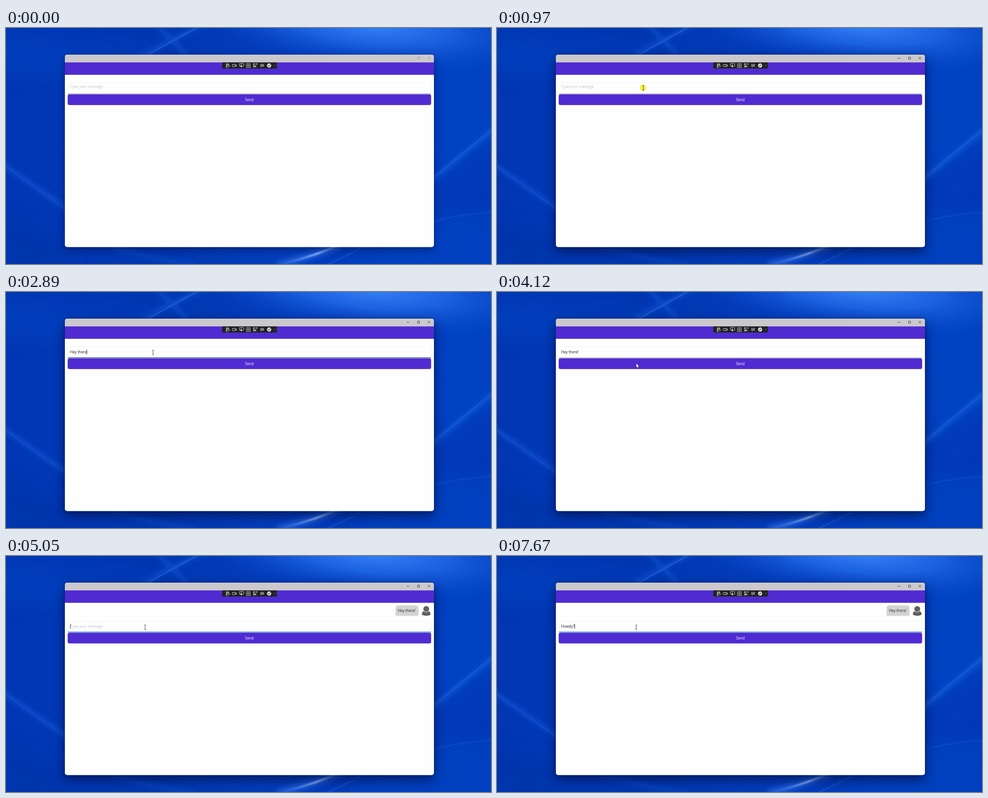
An HTML page that plays this animation: 1071x523 px, repeating every 8000 ms.

```html
<!DOCTYPE html>
<html lang="en">
<head>
<meta charset="utf-8">
<title>Chat window</title>
<style>
  html, body { margin: 0; width: 100%; height: 100%; overflow: hidden; background: #0238b4; }
  svg { display: block; }
  #win { position: absolute; left: 130px; top: 59px; width: 815px; height: 426.5px; border-radius: 5px; }
  #ui { position: absolute; left: 0; top: 0; }
  text { font: 8.05px "Open Sans", "Noto Sans", sans-serif; white-space: pre; }
</style>
</head>
<body>
<svg width="1071" height="523">
  <defs>
    <radialGradient id="glow" gradientUnits="userSpaceOnUse" cx="0" cy="0" r="1" gradientTransform="translate(800 -12) rotate(6) scale(400 105)">
      <stop offset="0" stop-color="#3a86fa"/>
      <stop offset=".45" stop-color="#2068e6" stop-opacity=".85"/>
      <stop offset="1" stop-color="#0a48c8" stop-opacity="0"/>
    </radialGradient>
    <linearGradient id="base" x2="1" y2="0">
      <stop offset="0" stop-color="#0236b2"/>
      <stop offset=".1" stop-color="#0238b6"/>
      <stop offset=".3" stop-color="#0137b0"/>
      <stop offset=".6" stop-color="#033ebd"/>
      <stop offset="1" stop-color="#0239b8"/>
    </linearGradient>
    <linearGradient id="flare" gradientUnits="userSpaceOnUse" x1="600" x2="735" y1="0" y2="0">
      <stop offset="0" stop-color="#2a6ae6" stop-opacity="0"/>
      <stop offset=".65" stop-color="#8db2ff"/>
      <stop offset="1" stop-color="#5a92f8" stop-opacity=".4"/>
    </linearGradient>
    <filter id="b1" x="-50%" y="-50%" width="200%" height="200%"><feGaussianBlur stdDeviation="1.3"/></filter>
    <filter id="b6" x="-50%" y="-50%" width="200%" height="200%"><feGaussianBlur stdDeviation="6"/></filter>
    <filter id="b20" x="-50%" y="-50%" width="200%" height="200%"><feGaussianBlur stdDeviation="20"/></filter>
  </defs>
  <rect width="1071" height="523" fill="url(#base)"/>
  <g filter="url(#b20)">
    <path d="M-30 5Q120 60 330 40L330 100H-30Z" fill="#0846c2" opacity=".55"/>
    <path d="M940 30L1110 0V240L940 330Z" fill="#0a4ccc" opacity=".5"/>
    <path d="M940 420Q1000 405 1110 410V560H700Z" fill="#0644c4" opacity=".6"/>
    <path d="M-30 420L140 470V560H-30Z" fill="#0234ac"/>
  </g>
  <rect x="380" width="691" height="160" fill="url(#glow)"/>
  <g fill="none" filter="url(#b6)" stroke="#1259d8">
    <path d="M-20 292Q60 350 150 410" stroke-width="11" opacity=".6"/>
    <path d="M1095 210Q1020 270 930 345" stroke-width="12" opacity=".7"/>
    <path d="M330 -10L400 60M300 62Q360 25 450 -12" stroke-width="10" opacity=".6"/>
    <path d="M600 525Q680 505 740 480" stroke-width="12" stroke="#2f70e8" opacity=".8"/>
    <path d="M230 485Q310 510 420 525" stroke-width="9" opacity=".45"/>
  </g>
  <g fill="none" filter="url(#b1)">
    <path d="M312 60Q365 30 425 -3" stroke="#3878e8" stroke-width="2" opacity=".65"/>
    <path d="M948 329Q1010 275 1075 224" stroke="#246ae0" stroke-width="3" opacity=".5"/>
    <path d="M-5 303Q60 350 135 404" stroke="#1c5cd8" stroke-width="3" opacity=".35"/>
    <path d="M945 429Q1000 412 1075 409" stroke="#1f60da" stroke-width="2.5" opacity=".45"/>
    <path d="M610 523Q680 505 728 484" stroke="url(#flare)" stroke-width="5"/>
    <path d="M710 524Q755 504 790 484" stroke="#2a68e0" stroke-width="2" opacity=".7"/>
  </g>
</svg>
<div id="win"></div>
<svg id="ui" width="1071" height="523">
  <defs><clipPath id="frame"><rect x="130" y="59" width="815" height="426.5" rx="5"/></clipPath></defs>
  <g clip-path="url(#frame)">
    <rect x="130" y="59" width="815" height="427" fill="#fefefe"/>
    <rect x="130" y="59" width="815" height="17.2" fill="#cbc9cc"/>
    <rect x="130" y="76.2" width="815" height="27.5" fill="#502bd2"/>
  </g>
  <path id="caption" d="M885 67.2h5.5M908.7 64.6h4.6v4.6h-4.6zM931.4 64.3l5 5M936.4 64.3l-5 5" fill="none" stroke-width=".9"/>

  <rect x="477.5" y="76.4" width="120.5" height="13.4" fill="#202020" stroke="#3a3a3a" stroke-width=".5"/>
  <g fill="none" stroke="#e4e4e4" stroke-width=".9">
    <path d="M486 79.2h6.2M486 81.4h6.2M486.4 81v6.2h3M486.5 84h3" stroke-width="1.1"/>
    <path d="M492 82l2.4 2.2-2.4 2.6-2.4-2.6z"/>
    <path d="M500 80.6h6v5h-6zM506 83l2.8-1.8v4.2L506 83.6"/>
    <path d="M518 84.7h-2.3v-5.9h9v5.9H523"/>
    <path d="M531 79h8.5v8.5H531zM533.6 81.6h3.3v3.3h-3.3z"/>
    <path d="M548 79.8h4.5M546.8 81v3M546 79h1.6v1.6H546zM553 79h1.6v1.6H553zM546 85h1.6v1.6H546zM552.3 83.5l2.5 2.7"/>
    <path d="M563 79.8q-3 3.2 0 6.5M568 79.8q3 3.2 0 6.5M566.8 79.5l-2.6 7M564.5 80.6q-1.8 2.2 0 4.6M566.6 81.4q1.6 1.8 0 4"/>
    <path d="M594.6 80.6l-2.6 2.6 2.6 2.6" stroke="#777"/>
  </g>
  <path d="M518.6 80.8v6.6l1.6-1.5h2.4zM548.6 81.4v6.2l1.5-1.4h2.3z" fill="#f4f4f4"/>
  <circle cx="581" cy="83.2" r="4.6" fill="#e8e8e8"/>
  <path d="M578.7 83.2l1.7 1.9 3-4" fill="none" stroke="#202020" stroke-width="1.1"/>

  <g id="sent">
    <path d="M866 109.6H905Q911 109.6 911 115.6V129Q911 132.6 907.4 132.6H863Q860.2 132.6 860.2 130V115.6Q860.2 109.6 866 109.6Z" fill="#d3d3d3"/>
    <text x="865.6" y="124.1" fill="#262626">Hey there!</text>
    <circle cx="928" cy="117.3" r="6.4" fill="#606060"/>
    <path d="M918.4 130C918.4 126 920 123 922.3 122.3C925.8 125.6 930.2 125.6 933.7 122.3C936 123 937.6 126 937.6 130C933 133.2 923 133.2 918.4 130Z" fill="#606060"/>
  </g>

  <g id="form">
    <rect x="136.5" y="121.5" width="802" height="24.4" rx="2.5" fill="#fefefe" stroke="#eee" stroke-width=".8"/>
    <rect id="line" x="136.6" width="801.8"/>
    <rect x="136.2" y="146.9" width="802.6" height="23.9" rx="4" fill="#502bd2"/>
    <text x="537.5" y="162" text-anchor="middle" fill="#fff">Send</text>
    <text id="entry" x="141.6"></text>
    <rect id="caret" y="127.8" width=".9" height="10.4" fill="#111"/>
  </g>

  <g id="pointer">
    <circle id="press" cx="-.8" cy="-.2" r="7.2" fill="#fff04a"/>
    <path id="beam" d="M-2-5h1.4L0-4.4.6-5H2M0-4.4V4.4M-2 5h1.4L0 4.4.6 5H2" fill="none" stroke="#222" stroke-width=".9"/>
    <path id="arrow" d="M0 0V10.2L2.3 8.1 3.9 11.6 5.5 10.9 4 7.5H7Z" fill="#fff" stroke="#1a1a1a" stroke-width=".7"/>
  </g>
</svg>
<script>
const LOOP = 8000;
const $ = id => document.getElementById(id);
const [win, caption, sent, form, line, entry, caret, pointer, press, beam, arrow] =
  ['win', 'caption', 'sent', 'form', 'line', 'entry', 'caret', 'pointer', 'press', 'beam', 'arrow'].map($);

const HEY = [1970, 2160, 2258, 2357, 2455, 2553, 2652, 2750, 2890, 3240];
const HOWDY = [6510, 6650, 6820, 7060, 7350, 7670];
const typed = (text, times, t) => text.slice(0, times.filter(at => at <= t).length);
const within = (t, from, to) => t >= from && t < to;
const show = (el, on) => el.setAttribute('visibility', on ? 'inherit' : 'hidden');
const set = (el, attrs) => { for (const k in attrs) el.setAttribute(k, attrs[k]); };
const mix = (a, b, p) => a + (b - a) * p;

function progress(t, from, to) {
  const p = Math.min(1, Math.floor((t - from) / 69 + 1) / (Math.floor((to - from) / 69) + 1));
  return p * p * (3 - 2 * p);
}

function pointerAt(t) {
  if (t < 900) {
    const p = progress(t, 70, 830), q = 1 - p;
    return [q * q * 888 + 2 * q * p * 480 + p * p * 323,
            q * q * 431 + 2 * q * p * 30 + p * p * 132];
  }
  if (t < 1030) return [323, 132.7];
  if (t < 3570) return [324.8, 134];
  const p = progress(t, 3570, 3900);
  return [mix(324.8, 307.3, p), mix(134, 157.7, p)];
}

function render(t) {
  const active = t >= 900, delivered = t >= 4240;
  const firstFocus = within(t, 1030, 3990);
  const focused = firstFocus || t >= 4980;
  const text = delivered ? typed('Howdy?', HOWDY, t) : typed('Hey there!', HEY, t);

  win.style.boxShadow = active
    ? '0 10px 26px rgba(0,8,50,.62), 0 0 5px rgba(0,8,50,.4)'
    : '0 6px 18px rgba(0,8,50,.45), 0 0 3px rgba(0,8,50,.3)';
  caption.setAttribute('stroke', active ? '#34343c' : '#a3a1a5');
  show(sent, delivered);
  form.setAttribute('transform', `translate(0 ${delivered ? 23 : 0})`);
  set(line, {
    y: focused ? 144.8 : 145.2,
    height: focused ? 1.4 : 1,
    fill: !focused ? '#868686' : firstFocus ? '#1d4a78' : '#0a6cb8'
  });

  entry.textContent = text || 'Type your message';
  set(entry, { y: text || focused ? 135.8 : 133.3, fill: text ? '#1c1c1c' : '#c2c2c2' });
  show(caret, focused);
  caret.setAttribute('x', 141.7 + (text ? entry.getComputedTextLength() : 0));

  const [x, y] = pointerAt(t);
  const isBeam = within(t, 0, 3990) ? y > 121 && y < 146 : t >= 4500;
  show(pointer, t >= 70);
  pointer.setAttribute('transform', `translate(${x} ${y})`);
  show(press, within(t, 900, 1100) || within(t, 3990, 4120) || within(t, 4910, 5050));
  show(beam, isBeam);
  show(arrow, !isBeam);
}

const start = performance.now();
function tick() {
  render((performance.now() - start) % LOOP);
  requestAnimationFrame(tick);
}
tick();
</script>
</body>
</html>
```
